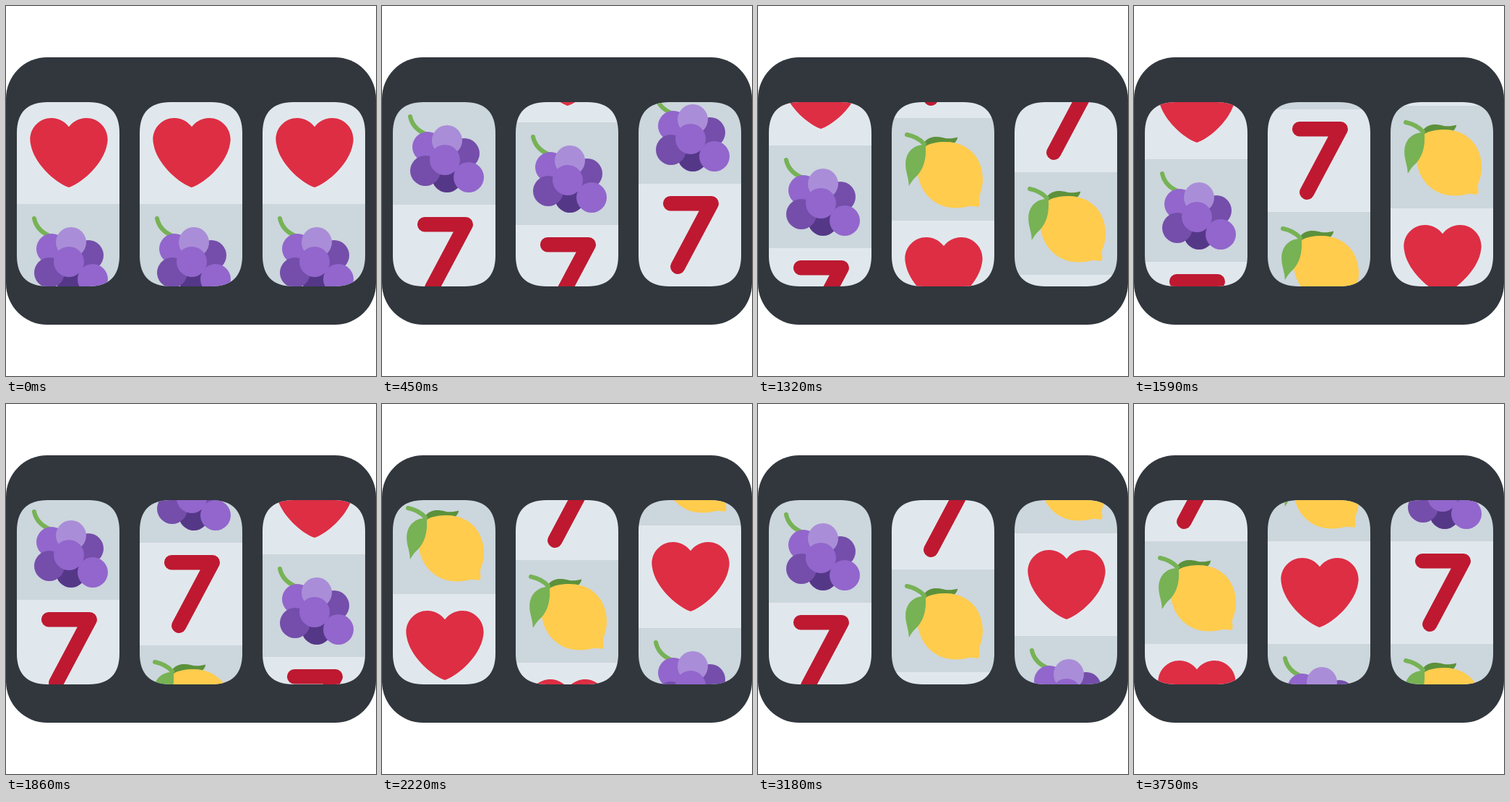
Write an HTML page that moves like this. It is 512x512 px and loops after 3.78 s.

```html
<!DOCTYPE html>
<html lang="en">
<head>
<meta charset="utf-8">
<title>Slot machine</title>
<style>
  html, body { margin: 0; width: 100%; height: 100%; overflow: hidden; background: #fff; }
  svg { display: block; width: 100%; height: 100%; }
</style>
</head>
<body>
<svg viewBox="0 0 512 512">
  <defs>
    <clipPath id="window">
      <path d="M0 175.7C0 147.2 14.2 133 42.7 133H99.3C127.8 133 142 147.2 142 175.7V345.3C142 373.8 127.8 388 99.3 388H42.7C14.2 388 0 373.8 0 345.3Z"/>
    </clipPath>

    <g id="heart" fill="#dd2e44">
      <path d="M35.885 11.833c0-5.45-4.418-9.868-9.867-9.868-3.308 0-6.227 1.633-8.018 4.129-1.791-2.496-4.71-4.129-8.017-4.129-5.45 0-9.868 4.417-9.868 9.868 0 .772.098 1.52.266 2.241C1.751 22.587 11.216 31.568 18 34.034c6.783-2.466 16.249-11.447 17.617-19.959.17-.721.268-1.469.268-2.242z"/>
    </g>

    <g id="grapes">
      <path d="M2 1Q3.2 6.5 9 9" fill="none" stroke="#77b255" stroke-width="2" stroke-linecap="round"/>
      <circle cx="19" cy="29" r="7" fill="#553788"/>
      <circle cx="10" cy="15" r="7" fill="#9266cc"/>
      <circle cx="27" cy="18" r="7" fill="#744eaa"/>
      <circle cx="19" cy="12" r="7" fill="#aa8dd8"/>
      <circle cx="9" cy="26" r="7" fill="#744eaa"/>
      <circle cx="18" cy="21" r="7" fill="#9266cc"/>
      <circle cx="29" cy="29" r="7" fill="#9266cc"/>
    </g>

    <g id="seven">
      <path d="M8.7 3.4H27.6L12.1 32.6" fill="none" stroke="#be1931" stroke-width="6.8" stroke-linecap="round" stroke-linejoin="round"/>
    </g>

    <g id="lemon">
      <path d="M8.6 6.3C10.5 2.7 14.5 2.6 18 3.5C20 4 22.3 3.8 24.4 3.2C24.3 4.4 23.5 5.5 22.6 6.2L10 8Z" fill="#5c913b"/>
      <path d="M18.5 5.3C25 5.2 29.5 8 32 11C35.5 15.2 36.6 21 35.7 26C35.4 28 34.7 29.2 34.4 30.5C34 32 34.9 33.6 34.3 34.8C33.6 35.9 31.6 34.7 30 35C27.5 35.5 24.5 36.2 20.5 35.6C14.5 34.7 9.5 30.5 7.3 25C5.5 20.5 5 14 8 9C9.5 6.5 13.5 5.4 18.5 5.3Z" fill="#ffcc4d"/>
      <path d="M9.6 6.6C4.5 6.6 .8 9.5 .4 15C.2 19 2 22 1.9 25.6C2.6 25 3.3 23.2 4.6 22C8.6 18.6 10.2 13.5 9.6 6.6Z" fill="#77b255"/>
      <path d="M1 2Q6 3 9 6.3" fill="none" stroke="#77b255" stroke-width="2" stroke-linecap="round"/>
    </g>

    <g id="strip"></g>
  </defs>

  <rect y="71" width="512" height="370" rx="57" fill="#31373d"/>
  <g id="reels"></g>
</svg>

<script>
  const CELL = 142, LOOP = 4 * CELL, START = 132;
  const STEP = 30, STEPS = 126;
  const TRAVEL = [-4912, -3918, -5906];
  const byId = id => document.getElementById(id);

  byId('strip').innerHTML = ['heart', 'grapes', 'seven', 'lemon'].map((name, i) => {
    const y = i * CELL;
    return `<rect y="${y}" width="${CELL}" height="${CELL}" fill="${i % 2 ? '#ccd6dd' : '#e1e8ed'}"/>
      <use href="#${name}" transform="translate(18 ${y + 17}) scale(3)"/>`;
  }).join('');

  byId('reels').innerHTML = TRAVEL.map((_, i) =>
    `<g transform="translate(${15 + 170 * i} 0)" clip-path="url(#window)">
      <g class="reel"><use href="#strip"/><use href="#strip" y="${-LOOP}"/></g>
    </g>`).join('');

  const reels = document.querySelectorAll('.reel');
  const ease = u => u < 0.5 ? 2 * u * u : 1 - 2 * (1 - u) ** 2;
  const wrap = y => ((y % LOOP) + LOOP) % LOOP;

  function draw(ms) {
    const step = Math.floor(ms / STEP) % STEPS;
    const e = ease(step / (STEPS - 1));
    reels.forEach((reel, i) => {
      const y = wrap(START + Math.round(TRAVEL[i] * e));
      reel.setAttribute('transform', `translate(0 ${y})`);
    });
  }

  const t0 = performance.now();
  function tick() {
    draw(performance.now() - t0);
    requestAnimationFrame(tick);
  }
  tick();
</script>
</body>
</html>
```
